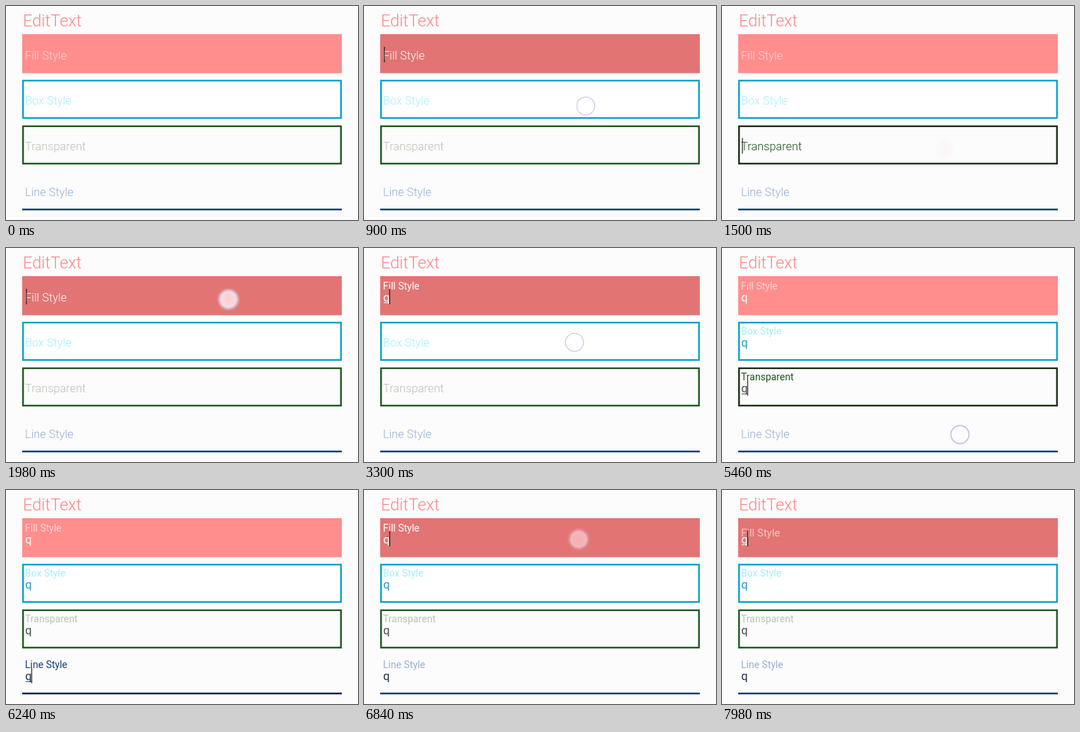
An HTML page with a canvas for the animation above (8 s loop, 500 by 304 pixels).

```html
<!DOCTYPE html>
<html lang="en">
<head>
<meta charset="utf-8">
<title>EditText styles</title>
<style>
  html, body { margin: 0; width: 100%; height: 100%; overflow: hidden; background: #fcfcfc; }
  canvas { display: block; width: 500px; height: 304px; }
</style>
</head>
<body>
<canvas id="stage" width="500" height="304"></canvas>
<script>
const ctx = document.getElementById('stage').getContext('2d');
const LOOP = 8000, LABEL_MS = 220, BLINK_MS = 500;
const FONT = 'Roboto, sans-serif';
const LEFT = 23, WIDTH = 454, HEIGHT = 55.5, PITCH = 64.8, TOP = 40;

// Each pair is [idle, focused]; edits are [time, has text].
const fields = [
  { name: 'Fill Style', kind: 'fill', edge: ['#ff8e8d', '#e27474'], label: ['#ffd4d4', '#ffffff'],
    ink: ['#ffffff', '#ffffff'], edits: [[2820, true], [7230, false], [7905, true]] },
  { name: 'Box Style', kind: 'box', edge: ['#05a2c9', '#067f9f'], label: ['#a5eefc', '#06b4d8'],
    ink: ['#2599bc', '#2599bc'], edits: [[3900, true]] },
  { name: 'Transparent', kind: 'outline', edge: ['#1f5a20', '#1c2f15'], label: ['#b9c3b5', '#1f5520'],
    ink: ['#444b44', '#444b44'], edits: [[4980, true]] },
  { name: 'Line Style', kind: 'line', edge: ['#113c78', '#0a2449'], label: ['#98b0d2', '#113c78'],
    ink: ['#1c3348', '#1c3348'], edits: [[6050, true]] }
];

// Taps: [start, field, x, y]
const taps = [
  [240, 0, 316, 70], [880, 1, 315, 142], [1200, 2, 316, 203], [1520, 3, 317, 265],
  [1860, 0, 316, 73], [3280, 1, 299, 134], [4340, 2, 318, 200], [5420, 3, 338, 265],
  [6600, 0, 305, 70]
];
const FOCUS_DELAY = 80, RELEASE_DELAY = 220;

const clamp = v => Math.max(0, Math.min(1, v));
const easeOut = v => 1 - (1 - clamp(v)) ** 2;
const mix = (a, b, p) => a + (b - a) * p;
const lastBefore = (list, time) => list.filter(item => item[0] <= time).pop();

function text(str, x, y, size, weight, color, alpha = 1) {
  ctx.globalAlpha = alpha;
  ctx.font = `${weight} ${size}px ${FONT}`;
  ctx.fillStyle = color;
  ctx.fillText(str, x, y);
  ctx.globalAlpha = 1;
}

function rect(color, x, y, w, h) {
  ctx.fillStyle = color;
  ctx.fillRect(x, y, w, h);
}

function drawFrame(field, y, edge) {
  if (field.kind === 'fill') return rect(edge, LEFT, y, WIDTH, HEIGHT);
  if (field.kind === 'line') return rect(edge, LEFT, y + 53.4, WIDTH, 2.5);
  if (field.kind === 'box') rect('#ffffff', LEFT, y, WIDTH, HEIGHT);
  ctx.strokeStyle = edge;
  ctx.lineWidth = 2.4;
  ctx.strokeRect(LEFT + 1.2, y + 1.2, WIDTH - 2.4, HEIGHT - 2.4);
}

function drawLabel(field, y, color, edit, time) {
  const p = edit ? easeOut((time - edit[0]) / LABEL_MS) : 1;
  const raised = edit && edit[1] ? p : edit ? 1 - p : 0;
  const alpha = edit && edit[1] ? p : 1;
  text(field.name, 27, y + mix(35.5, 18.5, raised), mix(16.4, 14, raised),
    raised ? 400 : 300, color, alpha);
}

function drawField(field, index, time, focusTap) {
  const y = TOP + index * PITCH;
  const focused = focusTap && focusTap[1] === index;
  const pick = pair => pair[focused ? 1 : 0];
  const edit = lastBefore(field.edits, time);
  const typed = edit && edit[1];

  drawFrame(field, y, pick(field.edge));
  drawLabel(field, y, pick(field.label), edit, time);
  if (typed) text('q', 27.3, y + 35.5, 16.4, 400, pick(field.ink));
  if (!focused) return;

  // The composing underline disappears once the field has been left.
  const editedHere = edit && edit[0] > focusTap[0];
  if (typed && editedHere) rect(pick(field.ink), 28, y + 37.2, 8, 1);

  const released = focusTap[0] + RELEASE_DELAY;
  const sinceReset = time - Math.max(released, edit ? edit[0] : 0);
  if (sinceReset < 0 || sinceReset % (2 * BLINK_MS) < BLINK_MS) {
    rect('rgba(20,15,15,.8)', typed ? 35.8 : 28.3, y + 18, 1.4, 22);
  }
}

function disc(x, y, r, fill) {
  ctx.beginPath();
  ctx.arc(x, y, r, 0, 2 * Math.PI);
  ctx.fillStyle = fill;
  ctx.fill();
}

function drawTap([start, , x, y], time) {
  const age = time - start;
  if (age < 0 || age > 320) return;
  const pressed = clamp((age - 45) / 50);
  const fade = 1 - clamp((age - 160) / 160);

  if (pressed) {
    ctx.globalAlpha = pressed * fade;
    const halo = ctx.createRadialGradient(x, y, 11, x, y, 17);
    halo.addColorStop(0, 'rgba(255,235,245,.6)');
    halo.addColorStop(1, 'rgba(255,235,245,0)');
    disc(x, y, 17, halo);
    const glow = ctx.createRadialGradient(x, y, 1, x, y, 12);
    glow.addColorStop(0, 'rgba(255,205,205,.95)');
    glow.addColorStop(1, 'rgba(255,222,224,.9)');
    disc(x, y, 12, glow);
  }
  ctx.globalAlpha = fade ** 2;
  ctx.strokeStyle = '#c3c3e2';
  ctx.lineWidth = mix(1, 1.8, clamp((age - 20) / 25));
  ctx.beginPath();
  ctx.arc(x, y, 12.8, 0, 2 * Math.PI);
  ctx.stroke();
  ctx.globalAlpha = 1;
}

function draw(time) {
  rect('#fcfcfc', 0, 0, 500, 304);
  text('EditText', 24, 29, 23.6, 300, '#ff8588');
  const focusTap = lastBefore(taps, time - FOCUS_DELAY);
  fields.forEach((field, i) => drawField(field, i, time, focusTap));
  taps.forEach(tap => drawTap(tap, time));
}

const begin = performance.now();
function tick() {
  draw((performance.now() - begin) % LOOP);
  requestAnimationFrame(tick);
}
tick();
</script>
</body>
</html>
```
